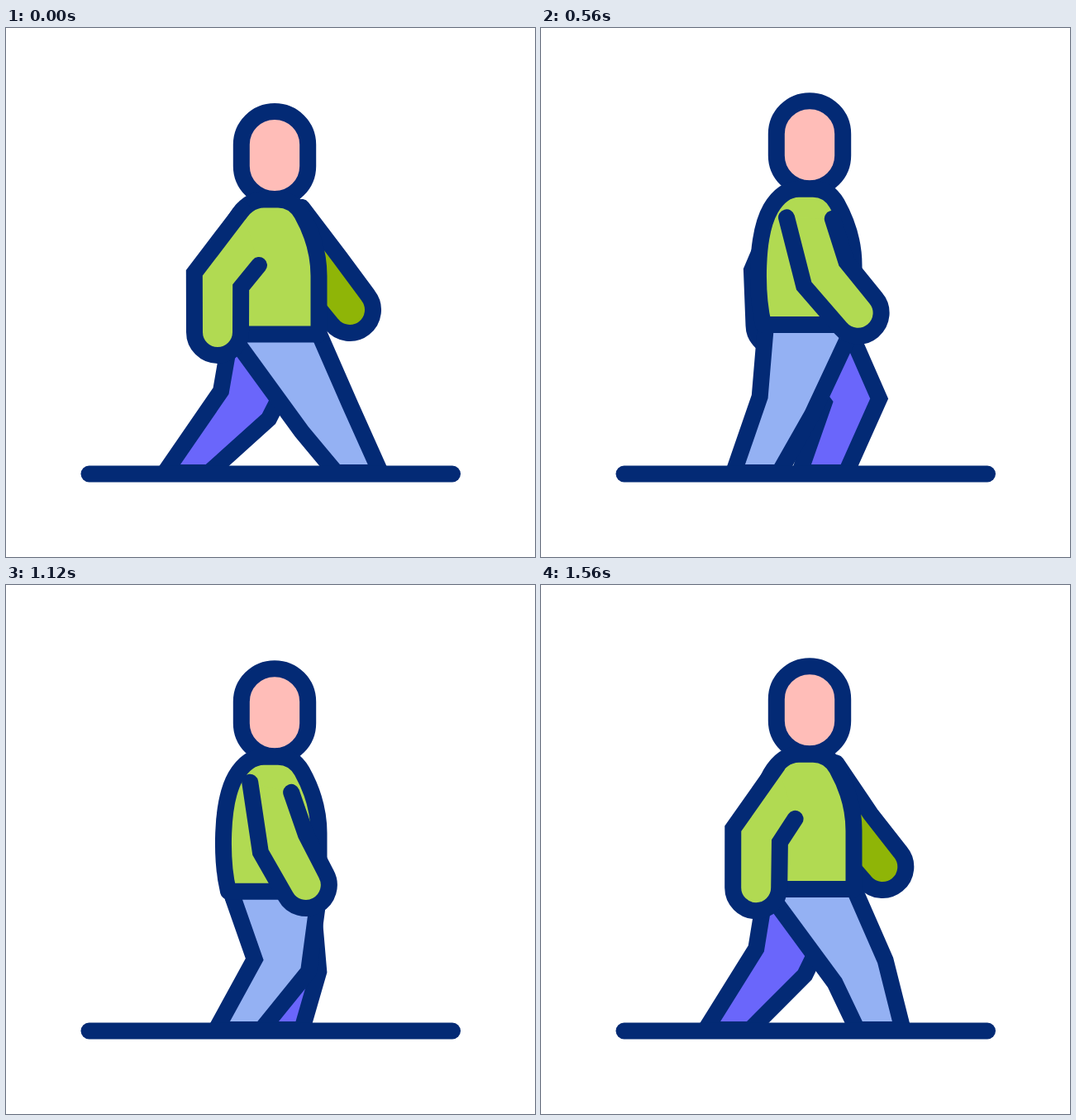
Write an HTML page that moves like this. It is 640x640 px and loops after 1.6 s.

```html
<!DOCTYPE html>
<html lang="en">
<head>
<meta charset="utf-8">
<title>Walking figure</title>
<style>
  html, body { margin: 0; height: 100%; overflow: hidden; background: #fff; }
  svg { display: block; width: 100%; height: 100%; }
  path, rect { stroke: #032a75; stroke-width: 20; }
  .arm, #ground { stroke-linecap: round; }
  #torso { stroke-linejoin: round; }
</style>
</head>
<body>
<svg viewBox="0 0 640 640">
  <path id="farArm" class="arm" fill="#8fb507"/>
  <path id="farLeg" fill="#6a66fb"/>
  <path id="nearLeg" fill="#94b1f3"/>
  <rect id="head" x="284.8" width="80.4" height="106" rx="40" fill="#ffbdb8"/>
  <path id="torso" fill="#b1da52"/>
  <path id="nearArm" class="arm" fill="#b1da52"/>
  <path id="ground" d="M100.5 539.5H540"/>
</svg>
<script>
const LOOP = 1600, HALF = LOOP / 2, STEP = 200;

// Key poses, one per STEP
const BOB = [[0, 0], [12.5, 9.5], [-8, -6], [-14, -13]]; // shoulders, belt
const LEG = [ // knee x, y and foot x: contact, down, passing, up, then the same behind
  [387, 472, 421], [397, 474, 402], [310, 464, 285], [293, 455, 259],
  [289, 456, 226], [307, 468, 248], [351, 455, 313], [382, 450, 352]
];
const ARM = [ // elbow and hand, from back to front
  [256, 305, 256, 368], [279, 309, 277, 373], [327, 315, 342, 368],
  [348, 309, 394, 355], [371, 296, 406, 341]
];

const set = (id, name, value) => document.getElementById(id).setAttribute(name, value);
const mix = (a, b, f) => a.map((v, k) => v + (b[k] - v) * f);
const add = ([x, y], [nx, ny], k) => [x + nx * k, y + ny * k];

function sample(keys, time) {
  const pos = time / STEP, i = Math.floor(pos);
  return mix(keys[i % keys.length], keys[(i + 1) % keys.length], pos - i);
}

// Unit vector towards the front side of the line from a to b
function normal(a, b) {
  const dx = b[0] - a[0], dy = b[1] - a[1], len = Math.hypot(dx, dy);
  return [dy / len, -dx / len];
}

// Back and front corner of a bent limb, set out along the bisector
function corners(root, joint, end, halfWidth) {
  const side = mix(normal(root, joint), normal(joint, end), 0.5);
  const k = halfWidth / Math.hypot(...side);
  return [add(joint, side, -k), add(joint, side, k)];
}

function legPath(t, belt, hipFront) {
  const [kx, ky, foot] = sample(LEG, t);
  const [back, front] = corners([325, belt], [kx, ky], [foot, 538], 33.5);
  // Carry each shin on from y 530 down under the ground line
  const sole = (x, knee) => [x + (x - knee[0]) * 8 / (530 - knee[1]), 538];
  return `M272 ${belt}L${[back, sole(foot - 28.5, back), sole(foot + 28.5, front), front]} ${hipFront} ${belt}`;
}

function armPath(t, dy, frontEnd, dx = 0) {
  const [ex, ey, hx, hy] = sample(ARM, t < HALF ? t : LOOP - t);
  const swing = (hx - 256) / 150;
  const elbow = [ex + dx, ey + dy], hand = [hx + dx, hy + dy];
  const [low, high] = corners([313, 222 + dy], elbow, hand, 29.5);
  const side = normal(elbow, hand);
  const [sx, sy] = mix([286, 220], [299, 246], swing);
  const [nx, ny] = mix([306, 287], frontEnd, swing);
  return `M${sx} ${sy + dy}L${[low, add(hand, side, -28)]}` +
    `A28 28 0 0 0 ${add(hand, side, 28)}L${high} ${nx} ${ny + dy}`;
}

function torsoPath(dy, belt) {
  const p = (x, y) => `${x} ${y + dy} `;
  return `M269 ${belt}C${p(260.5, 335)}${p(259, 264)}${p(278, 231)}` +
    `Q${p(292, 207.5)}${p(312, 207.5)}L${p(329, 207.5)}` +
    `Q${p(348, 207.5)}${p(358, 225)}C${p(372, 250)}${p(378.5, 276)}${p(378.5, 300)}` +
    `L378.5 ${belt}Z`;
}

function draw(now) {
  const t = now % LOOP, opposite = (t + HALF) % LOOP, phase = t / LOOP * 2 * Math.PI;
  const [dy, beltDy] = sample(BOB, t), belt = 370.5 + beltDy;
  const lead = 5 * (Math.cos(phase) + Math.cos(2 * phase));
  set('head', 'y', 101 + dy);
  set('torso', 'd', torsoPath(dy, belt));
  set('nearLeg', 'd', legPath(t, belt, 379));
  set('farLeg', 'd', legPath(opposite, belt, 370));
  set('nearArm', 'd', armPath(t, dy, [361, 236]));
  set('farArm', 'd', armPath(opposite, dy, [358, 217], lead));
}

let start;
function tick(now) {
  start ??= now;
  draw(now - start);
  requestAnimationFrame(tick);
}
draw(0);
requestAnimationFrame(tick);
</script>
</body>
</html>
```
